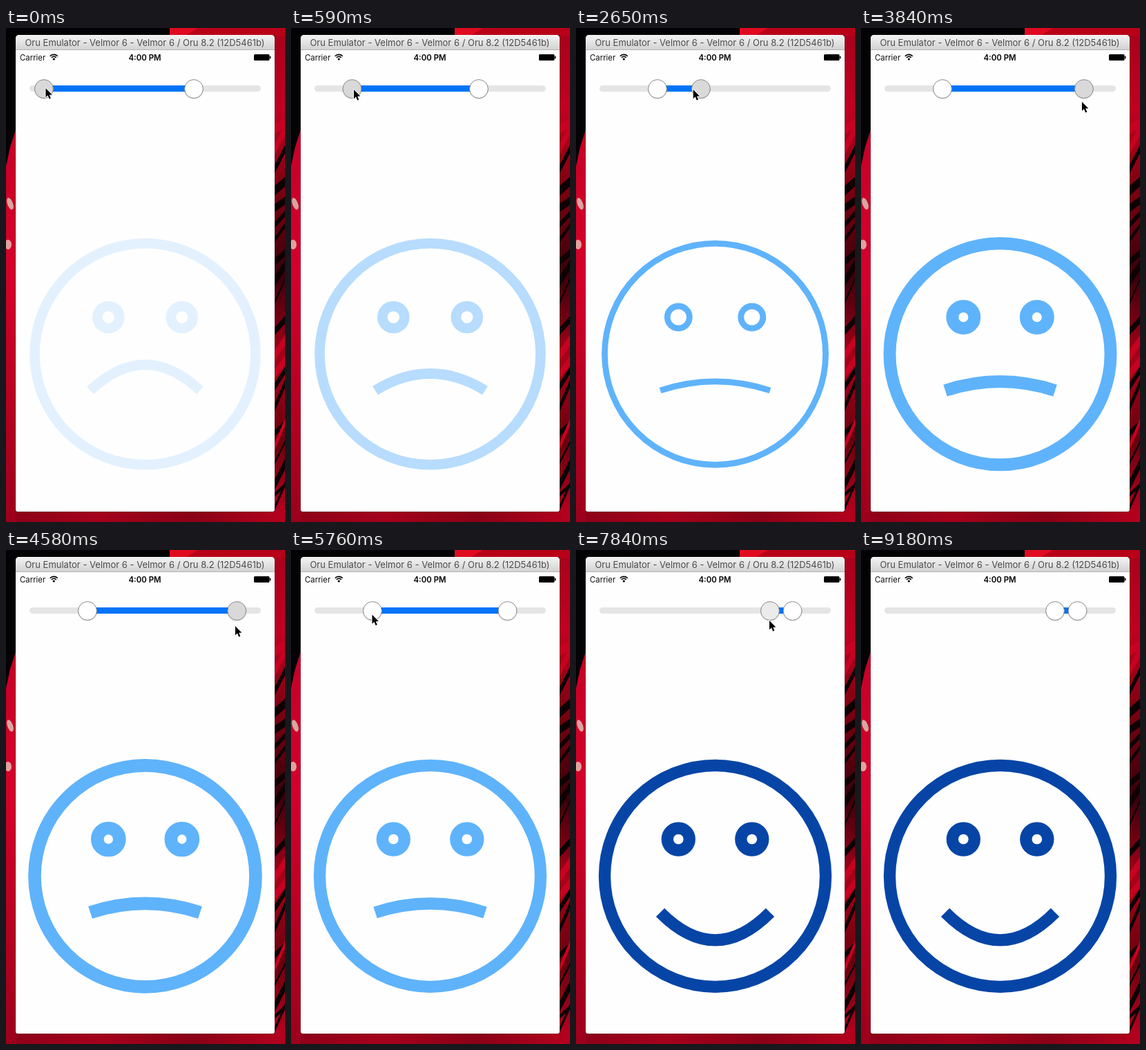
These frames come from a looping animation (404x714 px, 9780 ms). An HTML page with a canvas:

```html
<!DOCTYPE html>
<html lang="en">
<head>
<meta charset="utf-8">
<title>Range slider mood face</title>
<style>
  html, body { margin: 0; width: 100%; height: 100%; overflow: hidden; background: #000; }
  canvas { display: block; width: 404px; height: 714px; }
</style>
</head>
<body>
<canvas id="stage" width="404" height="714"></canvas>
<script>
const ctx = document.getElementById('stage').getContext('2d');
const LOOP = 9780, STEPS = 66, LEAD = 25;
const SANS = 'Inter, "Liberation Sans", sans-serif';

// Each track is a first position, then moves: [start step, end step, target].
const LOW = [[55], [0, 8, [122]], [8, 9, [118]], [41, 47, [281]]];
const HIGH = [[272], [14, 20, [149]], [20, 28, [355]], [30, 32, [313.5]]];
const POINTER = [
  [57.5, 87], [0, 8, [124.5, 91]], [9, 13, [266, 89]],
  [14, 20, [136, 89]], [20, 28, [354, 110]], [30, 32, [310, 110]],
  [33, 37, [117.5, 93.5]], [41, 47, [280, 102]], [53, 55, [300, 97]],
  [56, 59, [284, 92]], [60, 61, [274, 162]]
];

const mix = (a, b, p) => a + (b - a) * p;
const ease = p => p * p * (3 - 2 * p);
const clamp = p => Math.min(1, Math.max(0, p));

function at([first, ...moves], step) {
  return moves.reduce((pos, [from, to, target]) => {
    const p = ease(clamp((step - from) / (to - from)));
    return pos.map((v, i) => mix(v, target[i], p));
  }, first);
}

function seeded(seed) {
  return () => (seed = seed * 16807 % 2147483647) / 2147483647;
}

function poly(color, ...pts) {
  ctx.fillStyle = color;
  ctx.beginPath();
  pts.forEach(p => ctx.lineTo(...p));
  ctx.closePath();
  ctx.fill();
}

function oval(x, y, rx, ry, color, tilt = 0) {
  ctx.fillStyle = color;
  ctx.beginPath();
  ctx.ellipse(x, y, rx, ry, tilt, 0, 7);
  ctx.fill();
}

function box(x, y, w, h, r, color) {
  ctx.fillStyle = color;
  ctx.beginPath();
  ctx.roundRect(x, y, w, h, r);
  ctx.fill();
}

function ring(x, y, r) {
  ctx.beginPath();
  ctx.arc(x, y, r, 0, 7);
  ctx.stroke();
}

function blend(x, y, ...colors) {
  const g = ctx.createLinearGradient(0, 0, x, y);
  colors.forEach((c, i) => g.addColorStop(i / (colors.length - 1), c));
  return g;
}

function label(text, x, y, font, color, align = 'left') {
  ctx.font = font + ' ' + SANS;
  ctx.textAlign = align;
  ctx.fillStyle = color;
  ctx.fillText(text, x, y);
}

function drawPetals() {
  const rand = seeded(82);
  ctx.fillStyle = '#030305';
  ctx.fillRect(0, 0, 404, 714);

  ctx.fillStyle = blend(0, 714, '#a8001c', '#c00022', '#780010', '#38000a', '#a8001a', '#68000e', '#c00022');
  ctx.fillRect(388, 0, 16, 714);
  ctx.fillStyle = blend(404, 0, '#8c0018', '#a4001c', '#8a0016', '#b4001e');
  ctx.fillRect(0, 698, 404, 16);
  ctx.fillStyle = '#b80018';
  ctx.fillRect(237, 0, 167, 12);
  poly('#e00a20', [237, 0], [278, 0], [258, 12], [237, 12]);
  poly(blend(0, 714, '#a8001c', '#c80028', '#d4002c', '#b80022', '#9c001c'),
    [14, 147], [6, 172], [0, 200], [0, 714], [14, 714]);

  // Slanted folds down the right edge, alternately shaded and lit.
  for (let y = 140; y < 700; y += 16 + rand() * 22) {
    const rise = 10 + rand() * 30, thick = 5 + rand() * 11;
    const color = rand() < .65 ? '#0e0003' : '#c80022';
    poly(color, [388, y], [404, y - rise], [404, y - rise + thick], [388, y + thick]);
  }
  oval(6, 254, 4, 9, '#d9a6a0', -.35);
  oval(3, 313, 5, 7, '#e3a19c');
}

function drawWindow() {
  box(13.5, 10, 376, 689.5, 4, 'rgba(0,0,0,.5)');
  box(14, 10, 375, 689, [5, 5, 3, 3], '#fefefe');
  box(14, 10, 375, 22, [5, 5, 0, 0], blend(0, 32, '#fff', '#ebebeb', '#d1d1d1'));
  ctx.fillStyle = '#b4b4b4';
  ctx.fillRect(14, 31, 375, 1);
  label('Oru Emulator - Velmor 6 - Velmor 6 / Oru 8.2 (12D5461b)', 201, 26, '13px', '#4b4b4b', 'center');
  label('Carrier', 20, 46.5, '11.4px', '#111');
  label('4:00 PM', 201, 46.5, '600 11.4px', '#000', 'center');

  // signal fan
  ctx.strokeStyle = '#000';
  ctx.lineWidth = 1.6;
  for (const r of [4.6, 7.6]) {
    ctx.beginPath();
    ctx.arc(69.3, 46, r, -Math.PI * .76, -Math.PI * .24);
    ctx.stroke();
  }
  oval(69.3, 45, 1.6, 1.6, '#000');

  // battery
  box(359, 38, 22.5, 9, 1.5, '#000');
  box(381.8, 40.5, 1.6, 4, .8, '#000');
}

function drawThumb(x, color) {
  oval(x, 88.6, 14.2, 14.2, 'rgba(0,0,0,.13)');
  oval(x, 88, 13.4, 13.4, color);
  ctx.strokeStyle = '#8e8e8e';
  ctx.lineWidth = 1;
  ctx.stroke();
}

function drawSlider(low, high, step) {
  box(34, 83, 335, 9, 4.5, '#e5e5e5');
  ctx.fillStyle = '#0073f7';
  ctx.fillRect(low, 83, high - low, 9);
  // Pressed thumbs are grey and fade out on release.
  const tone = (press, release) =>
    step < press || step > release ? '#fff' : step < release ? '#d9d9d9' : '#ebebeb';
  drawThumb(low, step < 20 ? tone(0, 10) : tone(42, 53));
  drawThumb(high, tone(14, 34));
}

// Ten shades of blue, from pale through sky to navy.
function shade(mood) {
  const i = Math.min(9, Math.floor(mood * 10));
  const pale = [227, 241, 254], sky = [95, 179, 251], navy = [6, 69, 166];
  const rgb = i < 3
    ? pale.map((v, k) => mix(v, sky[k], i / 3))
    : sky.map((v, k) => mix(v, navy[k], (i - 3) / 6));
  return `rgb(${rgb})`;
}

function drawFace(low, high) {
  const value = x => (x - 45) / 310;
  const mood = clamp(value(low) * 1.5 - .015);
  ctx.strokeStyle = shade(mood);
  ctx.lineWidth = value(high) * 20;
  ring(201.5, 471.3, 160);
  ring(148.3, 418, 16);
  ring(254.8, 418, 16);
  ctx.beginPath();
  ctx.moveTo(122, 523.9);
  ctx.quadraticCurveTo(201.5, 523.9 + (mood * 2 - 1) * 80, 281, 523.9);
  ctx.stroke();
}

function drawPointer(x, y) {
  ctx.save();
  ctx.translate(x, y);
  ctx.scale(.9, .9);
  ctx.beginPath();
  [[0, 0], [0, 14.6], [3.3, 11.5], [5.7, 17.2], [8.2, 16.1], [5.8, 10.7], [10.4, 10.5]]
    .forEach(p => ctx.lineTo(...p));
  ctx.closePath();
  ctx.lineJoin = 'round';
  ctx.strokeStyle = '#fff';
  ctx.lineWidth = 2;
  ctx.stroke();
  ctx.fillStyle = '#000';
  ctx.fill();
  ctx.restore();
}

function draw(time) {
  const step = Math.floor((time + LEAD) * STEPS / LOOP) % STEPS;
  const [low] = at(LOW, step), [high] = at(HIGH, step);
  drawPetals();
  drawWindow();
  drawFace(low, high);
  drawSlider(low, high, step);
  if (step < 62) drawPointer(...at(POINTER, step));
}

const start = performance.now();
function loop() {
  draw((performance.now() - start) % LOOP);
  requestAnimationFrame(loop);
}
loop();
</script>
</body>
</html>
```
